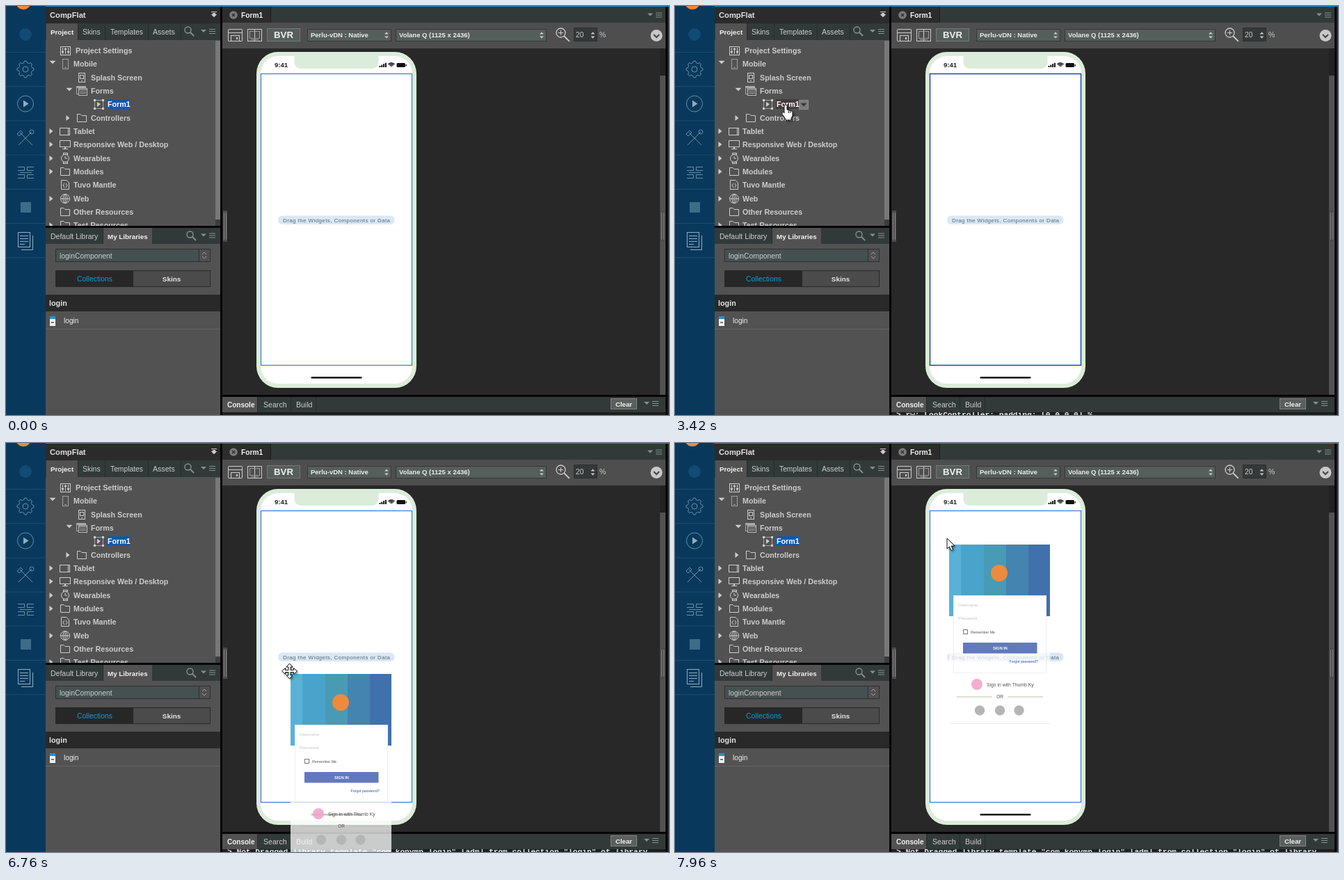
An HTML page with a canvas that plays this animation: 953 px wide and 588 px high, repeating every 8000 ms.

```html
<!DOCTYPE html>
<html lang="en">
<head>
<meta charset="utf-8">
<title>App designer</title>
<style>
html, body { margin: 0; width: 100%; height: 100%; overflow: hidden; background: #272727; }
canvas { display: block; }
</style>
</head>
<body>
<canvas id="stage" width="953" height="588"></canvas>
<script>
const ctx = document.getElementById('stage').getContext('2d');
const LOOP = 8000, STEP = 60;
const SANS = '"Liberation Sans", Arial, sans-serif';
const MONO = '"Liberation Mono", monospace';
const PALE = '#cdcdcd', BAR = '#323a39', PANEL = '#525252', MINT = '#dcecda';

// ---- drawing helpers ----
function rect(x, y, w, h, c) { ctx.fillStyle = c; ctx.fillRect(x, y, w, h); }
function box(x, y, w, h, c = PALE, lw = 1) {
  ctx.strokeStyle = c; ctx.lineWidth = lw; ctx.strokeRect(x + .5, y + .5, w - 1, h - 1);
}
function framed(x, y, w, h, fill, edge) { rect(x, y, w, h, fill); box(x, y, w, h, edge); }
function round(x, y, w, h, r, c) {
  ctx.beginPath(); ctx.roundRect(x, y, w, h, r); ctx.fillStyle = c; ctx.fill();
}
function trace(p) {
  ctx.beginPath();
  for (let i = 0; i < p.length; i += 2) ctx.lineTo(p[i], p[i + 1]);
}
function line(p, c = PALE, lw = 1) {
  trace(p); ctx.strokeStyle = c; ctx.lineWidth = lw; ctx.stroke();
}
function poly(p, c) { trace(p); ctx.closePath(); ctx.fillStyle = c; ctx.fill(); }
function disc(x, y, r, c) { ctx.beginPath(); ctx.arc(x, y, r, 0, 7); ctx.fillStyle = c; ctx.fill(); }
function ring(x, y, r, c = PALE, lw = 1) {
  ctx.beginPath(); ctx.arc(x, y, r, 0, 7); ctx.strokeStyle = c; ctx.lineWidth = lw; ctx.stroke();
}
function text(s, x, y, size, c = PALE, weight = 400, align = 'left', gap = 0) {
  ctx.font = `${weight} ${size}px ${SANS}`;
  ctx.textAlign = align; ctx.fillStyle = c;
  ctx.letterSpacing = gap + 'px';
  ctx.fillText(s, x, y);
  ctx.letterSpacing = '0px';
}
const down = (x, y, r, c = PALE) => poly([x - r, y - r / 2, x + r, y - r / 2, x, y + r / 2], c);
const right = (x, y, c = PALE) => poly([x - 2.5, y - 4, x + 2.5, y, x - 2.5, y + 4], c);
function updown(x, y, c = PALE) {
  poly([x - 3, y - 1.5, x, y - 4.5, x + 3, y - 1.5], c);
  poly([x - 3, y + 1.5, x, y + 4.5, x + 3, y + 1.5], c);
}
function menu(x, y) {
  down(x, y, 4, '#8a8f8e');
  for (const d of [-3, 0, 3]) rect(x + 8, y + d, 9, 1, '#8a8f8e');
}
function lens(x, y, r, c, lw) {
  ring(x, y, r, c, lw);
  line([x + r * .7, y + r * .7, x + r * 1.9, y + r * 1.9], c, lw + .6);
}

// ---- left rail ----
function rail() {
  const c = '#6690a8', bright = '#8fadbf';
  rect(0, 0, 57, 588, '#08395c');
  disc(25, -6, 11, '#ee8a3c');
  for (let i = 0; i < 7; i++) rect(0, 66 + i * 49.2, 57, 1, '#1d4c6c');
  disc(28, 41, 9, '#124b73');
  ring(28, 91, 4, c);
  ctx.beginPath();
  for (let i = 0; i < 33; i++) {
    const a = (i - .5) * Math.PI / 16, r = i % 4 < 2 ? 12 : 9.5;
    ctx.lineTo(28 + r * Math.cos(a), 91 + r * Math.sin(a));
  }
  ctx.strokeStyle = c; ctx.stroke();
  ring(28, 140.5, 11.5, c);
  poly([25, 135.5, 25, 145.5, 32.5, 140.5], bright);
  line([18, 200, 37, 181], c); line([20, 182, 38, 200], c);
  line([16, 184, 21, 179, 24, 182, 19, 187, 16, 184], c);
  ring(37, 181, 3, c);
  for (const y of [231.5, 247.5]) {
    const inner = y < 240 ? 236.5 : 242.5;
    line([17, y, 26.5, y, 26.5, inner, 17, inner], c);
    line([40, y, 30.5, y, 30.5, inner, 40, inner], c);
  }
  line([20, 239.5, 37, 239.5], c);
  rect(21, 282, 15, 15, '#3d6c8b');
  box(17, 325, 18, 22, bright); line([38.5, 330, 38.5, 350.5, 22, 350.5], bright);
  for (let i = 0; i < 4; i++) rect(20, 330 + i * 4, i == 3 ? 7 : 12, 1, bright);
}

// ---- project tree ----
const icons = {
  sliders(x, y) {
    box(x - 7, y - 6, 15, 13);
    for (const d of [-4, 0, 4]) { rect(x + d, y - 4, 1, 9, PALE); rect(x + d - 1, y - 3 + Math.abs(d), 3, 2, PALE); }
  },
  phone(x, y) { box(x - 4, y - 7, 9, 15, '#a0a0a0'); rect(x - 1, y + 5, 3, 1, '#a0a0a0'); },
  splash(x, y) { box(x - 5, y - 7, 10, 14); box(x - 3, y - 4, 6, 6); rect(x - 1, y + 4, 2, 1, PALE); },
  forms(x, y) {
    box(x - 8, y - 7, 14, 12, '#a8a8a8'); rect(x - 8, y - 6, 14, 2, '#a8a8a8');
    framed(x - 5, y - 4, 13, 11, PANEL, '#bbb');
    rect(x - 5, y - 2, 13, 1, '#bbb'); rect(x - 3, y + 1, 9, 1, '#999'); rect(x - 3, y + 3, 9, 1, '#999');
  },
  form(x, y) {
    box(x - 6, y - 6, 13, 13, '#a0a0a0'); poly([x - 2, y - 3, x + 3, y, x - 2, y + 4], PALE);
    for (const a of [-7, 5]) for (const b of [-7, 5]) rect(x + a, y + b, 3, 3, PALE);
  },
  folder(x, y) {
    line([x - 6.5, y - 5.5, x - 2, y - 5.5, x, y - 3.5, x + 6.5, y - 3.5, x + 6.5, y + 5.5,
      x - 6.5, y + 5.5, x - 6.5, y - 5.5]);
  },
  tablet(x, y) { box(x - 8, y - 5, 15, 11); rect(x + 4, y - 4, 1, 9, PALE); },
  screen(x, y) { box(x - 8, y - 6, 16, 10); rect(x - 1, y + 4, 2, 2, PALE); rect(x - 4, y + 6, 8, 1, PALE); },
  watch(x, y) { ring(x, y, 5.5); box(x - 3, y - 8, 7, 3); box(x - 3, y + 5, 7, 3); line([x, y - 3, x, y, x + 3, y]); },
  code(x, y) {
    line([x - 5.5, y - 6.5, x + 2, y - 6.5, x + 5.5, y - 3, x + 5.5, y + 6.5, x - 5.5, y + 6.5, x - 5.5, y - 6.5]);
    line([x - 1, y - 2, x - 3, y + 1, x - 1, y + 4]); line([x + 1, y - 2, x + 3, y + 1, x + 1, y + 4]);
  },
  globe(x, y) {
    ring(x, y, 6.5);
    ctx.beginPath(); ctx.ellipse(x, y, 3, 6.5, 0, 0, 7); ctx.stroke();
    line([x - 6, y, x + 6, y]); line([x, y - 6, x, y + 6]);
  }
};
// label, text x, icon, icon x, arrow x, open
const tree = [
  ['Project Settings', 100, 'sliders', 85], ['Mobile', 97, 'phone', 85, 67, 1],
  ['Splash Screen', 122, 'splash', 109], ['Forms', 122, 'forms', 109, 91, 1],
  ['Form1', 146, 'form', 133], ['Controllers', 122, 'folder', 109, 89],
  ['Tablet', 97, 'tablet', 85, 65], ['Responsive Web / Desktop', 97, 'screen', 85, 65],
  ['Wearables', 97, 'watch', 85, 65], ['Modules', 97, 'folder', 85, 65],
  ['Tuvo Mantle', 97, 'code', 85], ['Web', 97, 'globe', 85, 65],
  ['Other Resources', 97, 'folder', 85], ['Test Resources', 97, 'folder', 85, 65]
];
function project(t) {
  const hover = t >= 2060 && t < 4820, button = t >= 2060 && t < 4880;
  rect(57, 1, 251, 24, '#2b2b2b');
  text('CompFlat', 63, 16.5, 11.2, '#e0e0e0', 700);
  rect(295, 8, 8, 1, PALE); rect(297, 10, 4, 2, PALE); down(299, 14, 4.5);
  rect(57, 25, 251, 24, BAR);
  rect(58, 25, 45, 24, PANEL);
  for (const x of [103, 142, 204, 251]) rect(x, 25, 1, 24, '#262b2b');
  text('Project', 64, 40.5, 9.8, '#f2f2f2', 700);
  text('Skins', 110, 40.5, 10.5); text('Templates', 150, 40.5, 10.3); text('Assets', 211, 40.5, 10.6);
  lens(261.5, 34.5, 4.5, '#8a8f8e', 1.4); menu(284, 36);

  rect(57, 49, 251, 267, PANEL);
  rect(301, 50, 7, 257, '#787878'); rect(301, 307, 7, 9, '#3c3c3c');
  ctx.save();
  ctx.beginPath(); ctx.rect(57, 49, 244, 267); ctx.clip();
  tree.forEach(([label, x, icon, ix, ax, open], i) => {
    const y = Math.round(64 + i * 19.33);
    if (label == 'Form1') {
      rect(145, y - 7, 33, 14, hover ? '#453c3c' : '#1058b0');
      if (button) { framed(178, y - 6, 14, 14, '#7b7b7b', '#8c8c8c'); down(185, y + 1, 4.5, '#333'); }
    }
    icons[icon](ix, y);
    if (ax) open ? down(ax, y - 2, 4.5) : right(ax, y);
    text(label, x, y + 4, 10.7, label == 'Form1' ? '#fff' : PALE, 700);
  });
  ctx.restore();
}

function library(t) {
  const hot = t >= 5480 && t < 6340;
  rect(57, 316, 251, 3, '#050505');
  rect(57, 319, 251, 23, BAR);
  rect(140, 319, 70, 23, PANEL); rect(139, 319, 1, 23, '#262b2b');
  text('Default Library', 64, 335, 10.5);
  text('My Libraries', 146, 335, 9.8, '#f2f2f2', 700);
  lens(264.5, 328.5, 4.5, '#8a8f8e', 1.4); menu(284, 329.5);
  rect(57, 342, 251, 246, PANEL);
  framed(71, 349, 222, 19, '#455050', '#2c3030');
  framed(277, 349, 17, 19, '#505050', '#2c3030');
  line([282, 357, 285, 354, 288, 357], '#a0a0a0'); line([282, 360, 285, 363, 288, 360], '#a0a0a0');
  text('loginComponent', 77, 362.5, 10.4);
  framed(71, 380, 223, 24, '#4b4b4b', '#282828');
  rect(71, 380, 112, 24, '#272727');
  text('Collections', 127.5, 396, 10.4, '#0e9cd6', 400, 'center');
  text('Skins', 238, 396, 9.9, '#e6e6e6', 700, 'center');
  rect(57, 415, 251, 24, '#292929');
  text('login', 62, 430.5, 10.8, '#e2e2e2', 700);
  rect(57, 464, 251, 1, '#666');
  if (hot) {
    rect(58, 440, 249, 24, '#0095f6');
    framed(281, 444, 17, 16, '#3c87bd', '#65a4cf');
    down(289, 452, 4.5, '#d8e8f2');
  }
  rect(63, 446, 8, 14, '#f2f2f2'); rect(63, 446, 8, 4, '#2d8fc9'); rect(65, 454, 4, 2, '#777');
  text('login', 83, 455.5, 10.2, '#f0f0f0');
}

// ---- editor ----
function select(label, x, w) {
  framed(x, 33, w, 18, '#565e5c', '#343837');
  text(label, x + 5, 45, 9.5, '#ececec', 700);
  updown(x + w - 7, 42);
}
function editor() {
  rect(308, 1, 645, 587, '#050505');
  rect(311, 1, 637, 23, BAR);
  rect(311, 1, 70, 23, '#2c2c2c'); rect(380, 1, 1, 23, '#1d2020');
  disc(327, 13, 5.8, '#7b7b7b');
  line([325, 11, 329, 15], '#2c2c2c', 1.3); line([329, 11, 325, 15], '#2c2c2c', 1.3);
  text('Form1', 338, 16.5, 10.2, '#f2f2f2', 700);
  menu(926, 12.5);
  rect(311, 24, 637, 37, '#4e4e4e');
  round(319, 33, 21, 18, 2, PALE); rect(320, 34, 19, 16, '#4e4e4e');
  rect(320, 38, 19, 1, PALE); box(323, 42, 13, 9); rect(331, 45, 2, 3, PALE);
  box(347, 33, 21, 18); rect(357, 33, 1, 18, PALE);
  box(350, 36, 15, 11, '#999'); rect(352, 48, 11, 1, '#999');
  framed(375, 32, 48, 19, '#565e5c', '#737977');
  text('BVR', 399, 46, 13.2, '#f0f0f0', 700, 'center');
  select('Perlu-vDN : Native', 433, 121);
  select('Volane Q (1125 x 2436)', 560, 217);
  lens(797.5, 38.5, 6.5, PALE, 1.3);
  line([794, 38.5, 801, 38.5]); line([797.5, 35, 797.5, 42]);
  framed(816, 31, 34, 20, '#353838', '#2b2e2e');
  text('20', 819, 45, 10.2); updown(843.5, 42); text('%', 853, 45, 10.5);
  disc(935, 42.5, 8.5, '#c9c9c9'); line([931, 41, 935, 45, 939, 41], '#444', 2);
  rect(311, 61, 637, 498, '#282828');
  rect(940, 61, 8, 498, '#222'); rect(940, 100, 8, 459, '#525252');
  rect(951, 1, 2, 587, '#2b2b2b');
  for (const x of [312, 941]) {
    rect(x, 294, 6, 45, '#4c4c4c');
    rect(x + 1, 297, 1, 39, '#858585'); rect(x + 4, 297, 1, 39, '#858585');
  }
  rect(57, 0, 896, 1, '#0a8fc2');
}

function phone(t) {
  round(360, 66, 230, 483, 31, MINT);
  round(366, 72, 218, 471, 25, '#fff');
  round(414.5, 70, 121, 20, [0, 0, 9, 9], MINT);
  text('9:41', 386, 88, 9.6, '#222', 700);
  for (let i = 0; i < 4; i++) rect(536.5 + i * 2.8, 86 - i * 1.4, 2, 2 + i * 1.4, '#111');
  for (const r of [2, 4, 6]) {
    ctx.beginPath(); ctx.arc(554, 88, r, -2.4, -.74);
    ctx.strokeStyle = '#111'; ctx.lineWidth = 1.4; ctx.stroke();
  }
  round(561.5, 82, 12.5, 6, 1.5, '#111'); rect(574.7, 84, 1.2, 2.5, '#111');
  const strong = t >= 3420 && t < 6340;
  box(366, 97, 218, 420, strong ? '#1a45b4' : '#3c78cc', strong ? 1.5 : 1.2);
  round(438.5, 533, 73, 2.5, 1.2, '#111');
  round(391, 301.5, 167.5, 12.5, 6.2, '#dae8f4');
  text('Drag the Widgets, Components or Data', 398, 310.7, 8, '#566876', 400, 'left', .4);
}

function consoleBar(t) {
  rect(311, 562, 637, 26, BAR);
  rect(311, 584, 637, 4, '#1e1e1e');
  rect(311, 562, 50, 22, PANEL);
  for (const x of [361, 409, 445]) rect(x, 562, 1, 22, '#262b2b');
  text('Console', 318, 576.5, 10, '#f2f2f2', 700);
  text('Search', 370, 576.5, 10.6); text('Build', 417, 576.5, 10.5);
  framed(869, 564, 38, 16, '#59605e', '#7d8381');
  text('Clear', 888, 576, 9.7, '#f0f0f0', 700, 'center');
  menu(921, 571);
  if (t < 3420) return;
  ctx.save();
  ctx.beginPath(); ctx.rect(311, 584, 637, 4); ctx.clip();
  ctx.font = `700 11.2px ${MONO}`; ctx.textAlign = 'left'; ctx.fillStyle = '#e8e8e8';
  ctx.fillText(t < 6400 ? '> rw: LookController: padding: [0,0,0,0] %'
    : '> Not Dragged library template "com.konymp.login" [adm] from collection "login" of library', 318, 591);
  ctx.restore();
}

// ---- dragged login card ----
function card(x, y) {
  ctx.save();
  ctx.translate(x, y);
  rect(0, 0, 145, 258, 'rgba(255,255,255,.74)');
  // the banner stops where the form covers it
  ctx.save();
  ctx.beginPath(); ctx.rect(0, 0, 145, 103); ctx.rect(6, 73, 134, 112); ctx.clip('evenodd');
  const edges = [0, 17, 50, 82, 114, 145];
  ['#59b1d8', '#4aa3ca', '#499ab4', '#4384b0', '#4171ad'].forEach((c, i) =>
    rect(edges[i], 0, edges[i + 1] - edges[i], 103, c));
  ctx.restore();
  disc(72, 41, 12, '#ee8a3c');
  box(6, 73, 134, 112, 'rgba(120,120,120,.12)');
  text('Username', 13, 89, 6.2, '#c4c4c4'); text('Password', 13, 108, 6.2, '#c4c4c4');
  box(20, 122, 7, 7, '#777'); text('Remember Me', 31, 127.5, 5.3, '#555');
  rect(20, 141, 106.5, 15.5, '#627abd');
  text('SIGN IN', 73.5, 150.8, 5.6, '#fff', 700, 'center');
  text('Forgot password?', 128, 170, 5.2, '#2f4f9e', 400, 'right');
  disc(40, 201, 8, 'rgba(240,160,197,.85)');
  text('Sign in with Thumb Ky', 54, 203.5, 6.8, '#555');
  text('OR', 73, 221, 6.5, '#555', 400, 'center');
  rect(11, 218.5, 51, 1, '#c2c2b6'); rect(84, 218.5, 51, 1, '#c2c2b6');
  for (const cx of [44, 73, 100.5]) disc(cx, 238.5, 7.2, '#b5b5b5');
  rect(0, 257, 145, 1, 'rgba(150,150,150,.2)');
  ctx.restore();
}

// ---- pointers ----
const arrowShape = [0, 0, 0, 15, 3.5, 12, 6, 17.5, 8.6, 16.4, 6.2, 11, 11, 11];
const handShape = [-2, 1, -1, 0, 1, 0, 2, 1, 2, 7, 9, 9, 10, 10.5, 10, 16, 8, 19, 8, 22,
  0, 22, -1, 19, -5, 13.5, -5, 11, -3.5, 10.5, -2, 12];
const moveShape = [];
for (let k = 0; k < 4; k++) {
  const c = [1, 0, -1, 0][k], s = [0, 1, 0, -1][k];
  for (const [x, y] of [[-1.5, -1.5], [-1.5, -6], [-4.5, -6], [0, -11], [4.5, -6], [1.5, -6]])
    moveShape.push(x * c - y * s, x * s + y * c);
}
function pointer(shape, x, y) {
  ctx.save();
  ctx.translate(x, y);
  ctx.lineJoin = 'round';
  ctx.shadowColor = 'rgba(0,0,0,.45)'; ctx.shadowBlur = 3; ctx.shadowOffsetX = ctx.shadowOffsetY = 2;
  poly(shape, '#fff');
  ctx.shadowColor = 'transparent';
  line([...shape, shape[0], shape[1]], '#111');
  if (shape == handShape) for (const k of [4.5, 7]) line([k, 8.5, k, 12], '#111');
  ctx.restore();
}

// Smooth path through [time, x, y] keys
function along(keys, t) {
  const n = keys.length - 1;
  t = Math.max(keys[0][0], Math.min(keys[n][0], t));
  let i = 0;
  while (i < n - 1 && t >= keys[i + 1][0]) i++;
  const a = keys[i], b = keys[i + 1], d = b[0] - a[0], u = (t - a[0]) / d;
  const slope = (j, k) => j == 0 || j == n ? 0
    : (keys[j + 1][k] - keys[j - 1][k]) / (keys[j + 1][0] - keys[j - 1][0]);
  return [1, 2].map(k => {
    const m = slope(i, k) * d, q = slope(i + 1, k) * d, v = 1 - u;
    return a[k] * (1 + 2 * u) * v * v + m * u * v * v + b[k] * u * u * (3 - 2 * u) - q * u * u * v;
  });
}
const enter = [[1400, 14, 540], [1640, 100, 320], [1880, 234, 95], [2120, 173, 140]];
const settle = [[2390, 173, 140], [2630, 159, 142]];
const lower = [[4820, 159, 153], [5180, 143, 295], [5540, 113, 447]];
const drag = [[6280, 117, 454], [6520, 275, 415], [6760, 409, 332], [7000, 430, 221], [7120, 413, 181], [7300, 394, 146]];
const held = (t, start) => start + Math.floor((t - start) / STEP) * STEP;

function overlay(t) {
  if (t < 1400) return;
  if (t < 2450) pointer(arrowShape, ...along(enter, held(t, 1400)));
  else if (t < 2960) pointer(arrowShape, ...along(settle, held(t, 2450)));
  else if (t < 4820) pointer(handShape, 159, 142);
  else if (t < 6340) {
    const [x, y] = along(lower, held(t, 4820));
    pointer(y > 316 && y < 436 ? arrowShape : handShape, x, y);
  } else {
    const [x, y] = along(drag, held(t, 6340)).map(Math.round);
    card(x, y);
    if (t < 7960) pointer(moveShape, x - 1.5, y - 4);
    else pointer(arrowShape, 391, 137);
  }
}

function frame(now) {
  const t = Math.max(0, now) % LOOP;
  editor();
  rail();
  project(t);
  library(t);
  phone(t);
  consoleBar(t);
  overlay(t);
  requestAnimationFrame(time => frame(time - begin));
}
const begin = performance.now();
frame(0);
</script>
</body>
</html>
```
